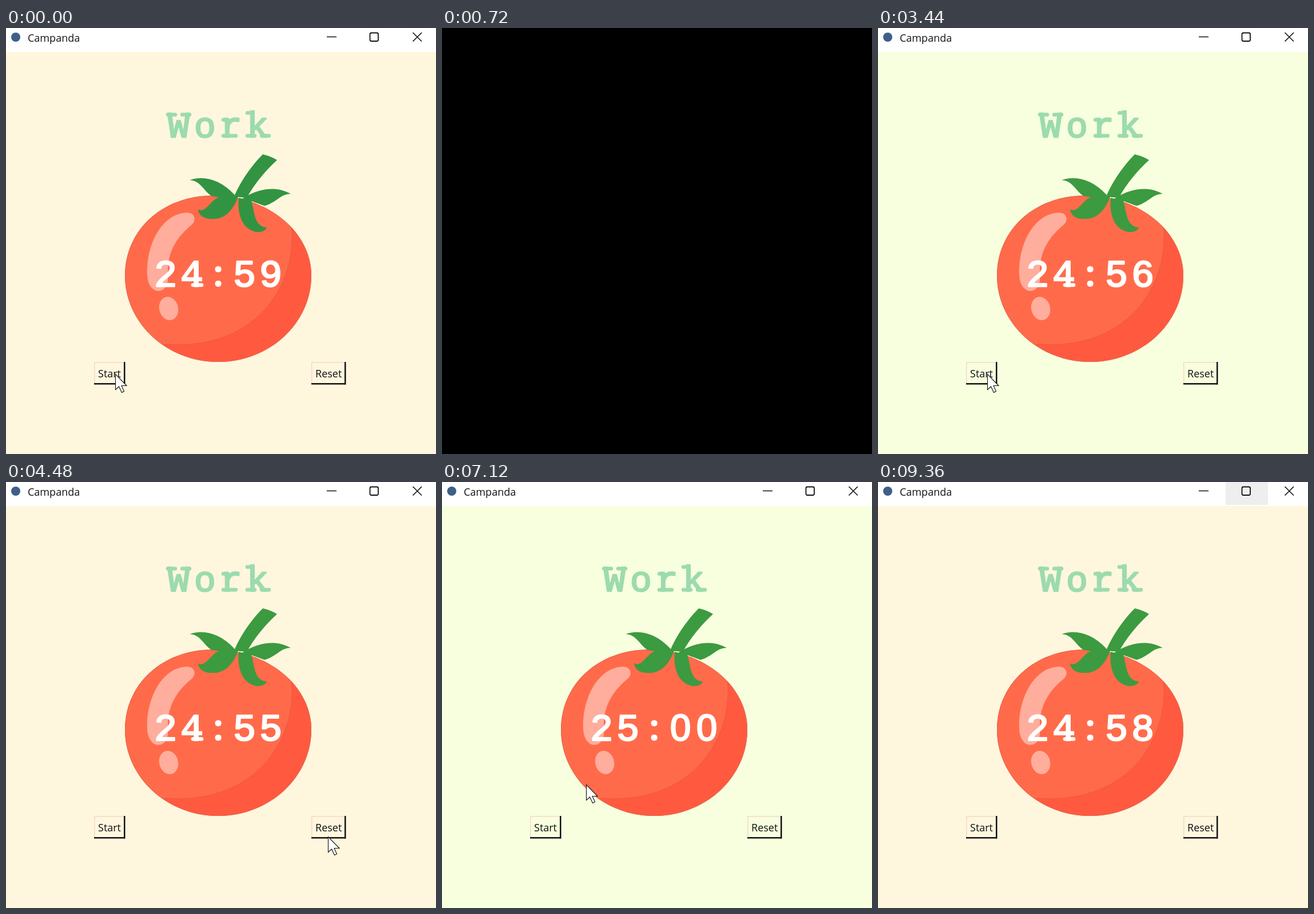
Recreate the animation shown at these times as an HTML page with a canvas. Size 752 by 745 pixels, loop 9.44 s.

```html
<!DOCTYPE html>
<html lang="en">
<head>
<meta charset="utf-8">
<title>Timer</title>
<style>
  html, body { margin: 0; width: 100%; height: 100%; overflow: hidden; background: #fff; }
  canvas { display: block; }
</style>
</head>
<body>
<canvas id="stage" width="752" height="745"></canvas>
<script>
const ctx = document.getElementById('stage').getContext('2d');
const LOOP = 9440, STEP = 80;
const RESET_AT = 4640, START_AT = 6880;
const CREAM = '#fff6de', LIME = '#f8ffde', MINT = '#9cdbae';
const UI = '"Open Sans", sans-serif';
const PITCH = 46, CENTER = 371;

const between = (t, a, b) => t >= a && t < b;

// Pointer stops: time, x, y
const stops = [
  [0, 191, 605], [3680, 191, 605], [3960, 375, 636], [4240, 562, 630],
  [4400, 562, 630], [4560, 564, 610], [6240, 564, 610], [6720, 186, 609],
  [6960, 186, 609], [7120, 252, 529], [8480, 252, 529], [9120, 645, -40], [LOOP, 645, -40]
];

function pointerAt(t) {
  const i = stops.findIndex(s => s[0] > t);
  const [t0, x0, y0] = stops[i - 1], [t1, x1, y1] = stops[i];
  const p = (t - t0) / (t1 - t0), e = p * p * (3 - 2 * p);
  return [x0 + (x1 - x0) * e, y0 + (y1 - y0) * e];
}

function secondsAt(t) {
  if (t < RESET_AT) return 1499 - Math.floor((t + 200) / 1000);
  if (t < START_AT) return 0;
  return 1500 - Math.floor((t - START_AT) / 1000);
}

function fillPath(d, color) {
  ctx.fillStyle = color;
  ctx.fill(new Path2D(d));
}

function strokePath(d, color, width, cap = 'butt') {
  ctx.strokeStyle = color;
  ctx.lineWidth = width;
  ctx.lineCap = cap;
  ctx.stroke(new Path2D(d));
}

function label(text, x, y, size) {
  ctx.font = `${size}px ${UI}`;
  ctx.fillStyle = '#111';
  ctx.textAlign = 'left';
  ctx.fillText(text, x, y);
}

// Slab serifs relative to each letter's centre and baseline
const slabs = {
  W: 'M-19-39H-6M6-39H19',
  r: 'M-14-30H-6M-14-2H8',
  k: 'M-18-42H-10M-18-2H-5M7-2H20',
  T: 'M-16-39V-29M16-39V-29M-8-2H8',
  m: 'M-20-30H-14M-20-2H-12M14-2H20',
  4: 'M2-2H17'
};

function glyphFont(ch) {
  if (ch === '0') return '65px "Liberation Sans", sans-serif';
  if (ch === ':') return 'bold 64px "Noto Sans", sans-serif';
  return `${/\d/.test(ch) ? 67 : 63}px "Liberation Mono", monospace`;
}

// Rounded, even-weight lettering: regular glyphs thickened by a round outline
function slabText(text, baseline, color) {
  const left = CENTER - (text.length - 1) * PITCH / 2;
  ctx.textAlign = 'center';
  ctx.lineJoin = 'round';
  ctx.fillStyle = ctx.strokeStyle = color;
  [...text].forEach((ch, i) => {
    ctx.save();
    ctx.translate(left + i * PITCH, baseline);
    ctx.font = glyphFont(ch);
    ctx.fillText(ch, 0, 0);
    if (ch !== ':') {
      ctx.lineWidth = 2.6;
      ctx.strokeText(ch, 0, 0);
    }
    if (slabs[ch]) strokePath(slabs[ch], color, 6.5, 'round');
    ctx.restore();
  });
  ctx.lineJoin = 'miter';
}

function titleBar(hover) {
  ctx.fillStyle = '#fff';
  ctx.fillRect(0, 0, 752, 42);
  if (hover) {
    ctx.fillStyle = '#eee';
    ctx.fillRect(608, 0, 74, 40);
  }
  ctx.fillStyle = '#3f5f88';
  ctx.beginPath();
  ctx.arc(17, 16, 8, 0, Math.PI * 2);
  ctx.fill();
  label('Campanda', 38, 24, 18);
  strokePath('M561 15.5H578M711.5 8L727 23.5M727 8L711.5 23.5', '#111', 1.6);
  ctx.beginPath();
  ctx.roundRect(636.5, 8.5, 14.5, 14.5, 2.5);
  ctx.lineWidth = 1.8;
  ctx.stroke();
}

function tomato(leaf) {
  const body = 'M208 433C208 353 274 293 362 293C457 293 534 356 534 433C534 516 461 584 371 584C281 584 208 516 208 433Z';
  const edge = 'M499 340V346C510 440 445 566 276 553';
  ctx.save();
  fillPath(body, '#ff6b4a');
  ctx.clip(new Path2D(body));
  fillPath(edge + 'L260 600H550V340Z', '#ff5a40');
  strokePath(edge, '#e9583f', 1);
  strokePath(body, '#e8664c', 2);
  ctx.restore();

  const shine = '#ffad9c';
  fillPath('M316 323C328 322 335 334 325 344C300 364 283 390 283 425V441C281 467 249 468 247 432C245 375 275 324 316 323Z', shine);
  ctx.beginPath();
  ctx.ellipse(284.5, 490.5, 16.5, 20.7, -0.25, 0, Math.PI * 2);
  ctx.fill();

  [
    'M449 221Q463 224 474 231C455 248 435 272 421 297L399 295C410 268 430 240 449 221Z',
    'M321 266C345 257 375 265 399 291L405 297H381L360 294C347 287 340 266 321 266Z',
    'M336 317C351 325 357 298 378 294L406 295C398 317 384 334 362 334C346 334 337 328 336 317Z',
    'M407 297L429 302C435 320 433 347 456 349C454 355 446 357 440 357C415 354 404 329 407 297Z',
    'M418 295C440 283 470 274 498 290C480 290 472 306 452 311L430 303L410 302Z'
  ].forEach(d => fillPath(d, leaf));
}

function button(text, x, w) {
  const y = 584, h = 39;
  ctx.fillStyle = '#f3dac9';
  ctx.fillRect(x, y, w, 1.5);
  ctx.fillRect(x, y, 1.5, h);
  ctx.fillStyle = '#111';
  ctx.fillRect(x + w - 2, y, 2.5, h + 0.5);
  ctx.fillRect(x, y + h - 2, w, 2.5);
  label(text, x + 7, 611, 18);
}

function pointer(x, y) {
  ctx.save();
  ctx.translate(x + 0.5, y + 0.5);
  const arrow = 'M0 0V27L6 21.5L11 32L15 30L10.5 20H19.5Z';
  fillPath(arrow, '#fff');
  strokePath(arrow, '#111', 1.1);
  ctx.restore();
}

function draw(t) {
  if (between(t, 720, 800)) {
    ctx.fillStyle = '#000';
    ctx.fillRect(0, 0, 752, 745);
    return;
  }
  const lime = between(t, 2240, 4400) || between(t, 6240, 8240);
  ctx.fillStyle = lime ? LIME : CREAM;
  ctx.fillRect(0, 0, 752, 745);

  const [x, y] = pointerAt(t);
  titleBar(x > 608 && y < 40);
  slabText(between(t, RESET_AT, START_AT) ? 'Timer' : 'Work', 190.5, MINT);
  tomato(t < 720 ? '#329442' : '#3c9a40');

  const s = secondsAt(t);
  const pad = n => String(n).padStart(2, '0');
  slabText(`${pad(Math.floor(s / 60))}:${pad(s % 60)}`, 451.5, '#fff');

  button('Start', 154, 54);
  button('Reset', 534, 60);
  pointer(x, y);
}

const begin = performance.now();
function tick() {
  const t = (performance.now() - begin) % LOOP;
  draw(Math.floor(t / STEP) * STEP);
  requestAnimationFrame(tick);
}
tick();
</script>
</body>
</html>
```
